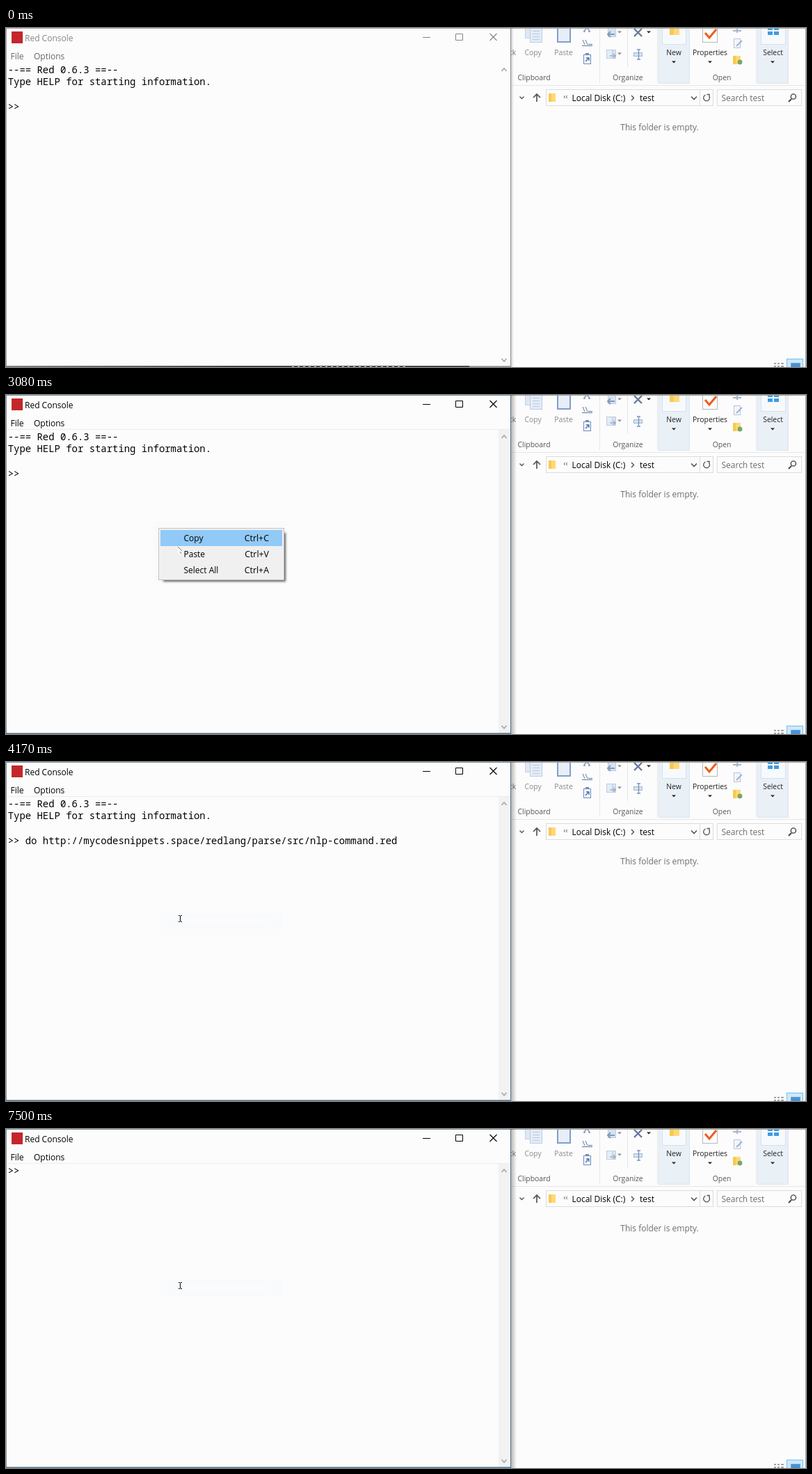
Write an HTML page with a canvas that moves like this. It is 1150x487 px and loops after 8000 ms.

```html
<!DOCTYPE html>
<html lang="en">
<head>
<meta charset="utf-8">
<title>Console session</title>
<style>
html, body { margin: 0; width: 100%; height: 100%; overflow: hidden; background: #fcfcfc; }
canvas { display: block; }
</style>
</head>
<body>
<canvas id="stage" width="1150" height="487"></canvas>
<script>
const ctx = document.getElementById('stage').getContext('2d');
const LOOP = 8000;
const UI = '"Open Sans", "Noto Sans", sans-serif';
const MONO = '"Noto Sans Mono", "DejaVu Sans Mono", monospace';
const BG = '#fcfcfc';

function rect(x, y, w, h, fill) {
  ctx.fillStyle = fill;
  ctx.fillRect(x, y, w, h);
}

function box(x, y, w, h, fill, stroke) {
  rect(x, y, w, h, fill);
  ctx.strokeStyle = stroke;
  ctx.lineWidth = 1;
  ctx.strokeRect(x + 0.5, y + 0.5, w - 1, h - 1);
}

function path(d, stroke, width = 1, fill) {
  const p = new Path2D(d);
  if (fill) { ctx.fillStyle = fill; ctx.fill(p); }
  if (stroke) { ctx.strokeStyle = stroke; ctx.lineWidth = width; ctx.stroke(p); }
}

function label(str, x, y, size = 12, color = '#000', align = 'left', family = UI) {
  ctx.font = `${size}px ${family}`;
  ctx.textAlign = align;
  ctx.fillStyle = color;
  ctx.fillText(str, x, y);
}

function fade(alpha, draw) {
  ctx.save();
  ctx.globalAlpha = alpha;
  draw();
  ctx.restore();
}

const dropArrow = (x, y, color = '#222') =>
  path(`M${x - 3} ${y - 1.5}h6l-3 3z`, null, 0, color);
const folder = (x, y, w, h) => {
  rect(x, y, w, h, '#ffd977');
  rect(x, y, w * 0.4, h, '#f7c951');
};

// ---- File browser ----

function ribbonIcons() {
  box(746, -4, 17, 19, '#dfe8f4', '#c3d2e6');
  box(753, -2, 18, 23, '#e4ecf7', '#bdcde3');
  for (let y = 4; y < 17; y += 4) rect(757, y, 10, 1, '#b9cae2');
  box(792, -4, 20, 25, '#e7eef8', '#819fc9');
  path('M793 -1V20H811V-1', '#819fc9', 2);

  path('M831 4l6 -6M839 4l-6 -6', '#7f93b3', 1.4);
  path('M830 5h3M837 5h3', '#7f93b3', 1.6);
  path('M829 17l3 7M833 17l3 7M837 23.5h6M828 25.5h15', '#60779c', 1);
  box(830, 38, 11, 14, '#f4f7fb', '#6f8db8');
  rect(833, 36, 5, 3, '#6f8db8');
  path('M833 48l4 -4M834 43h4v4', '#436fa9', 1.3);

  for (const y of [6, 37]) {
    box(865, y - 6, 12, 13, '#d8e3f1', '#bccde3');
    dropArrow(882, y, '#8b8b8b');
  }
  path('M875 9h-10m4 -4l-4 4l4 4', '#829bbd', 2);
  box(863, 31, 9, 13, '#e5edf7', '#bccde3');
  path('M868 40h8m-3 -3l3 3l-3 3', '#9db0ca', 1.5);
  path('M903 1l11 11M914 1l-11 11', '#667a9d', 2.4);
  dropArrow(924, 6);
  box(902, 35, 13, 6, '#d5e2f2', '#a3b9d6');
  path('M907 31h5M909.5 31v14M907 45h5', '#7b93b5', 1.3);

  box(943, -1, 35, 25, '#f7fafd', '#d5e1ec');
  folder(954, -2, 14, 12);
  box(1001, -2, 22, 23, '#fdfdfd', '#b8b8b8');
  path('M1005 7l6 7l10 -12', '#f25b1d', 3);
  path('M1045 4h12M1051 -1v8', '#a8b7cd', 2);
  box(1046, 15, 10, 14, '#f3f6fa', '#b9c5d7');
  path('M1050 26l8 -8', '#9fb3ce', 2);
  folder(1045, 40, 11, 12);
  ctx.beginPath();
  ctx.arc(1055, 49, 3.4, 0, 7);
  ctx.fillStyle = '#7da661';
  ctx.fill();

  box(1085, -1, 36, 25, '#f7fafd', '#d5e1ec');
  for (const x of [1095, 1104]) {
    rect(x, -2, 7, 5, '#3f9be0');
    rect(x, 5, 7, 5, '#3f9be0');
  }
}

function fileBrowser() {
  rect(724, 0, 426, 487, BG);
  box(938, -1, 45, 81, '#e9f0f6', '#dbe5ee');
  box(1080, -1, 45, 81, '#e9f0f6', '#dbe5ee');
  for (const x of [853, 936, 1078]) rect(x, 0, 1, 79, '#e4e5e6');
  rect(893, 0, 1, 56, '#e4e5e6');
  rect(726, 82, 424, 1, '#e6e7e8');
  ribbonIcons();

  const ribbon = [['ck', 728, '#777'], ['Copy', 757.5, '#8a8a8a'], ['Paste', 801.5, '#8a8a8a'],
    ['New', 960, '#222'], ['Properties', 1012, '#222'], ['Select', 1102.5, '#222']];
  for (const [str, x, color] of ribbon) label(str, x, 39, 10.4, color, 'center');
  for (const x of [960, 1012, 1102]) dropArrow(x, 49);
  for (const [str, x] of [['Clipboard', 759], ['Organize', 894], ['Open', 1029]])
    label(str, x, 75, 10.4, '#555', 'center');

  path('M738.5 98.5l3 3l3 -3', '#555', 1.4);
  path('M763 106v-11m-5 5l5 -5l5 5', '#555', 1.7);
  box(776, 88, 241, 24, BG, '#dcdcdc');
  rect(997, 89, 1, 22, '#dcdcdc');
  folder(780, 94, 10, 12);
  path('M804 97l-2 2l2 2M807 97l-2 2l2 2', '#555', 0.9);
  label('Local Disk (C:)', 813.5, 104.5);
  path('M899 97l3.5 3.5l-3.5 3.5', '#444', 1.3);
  label('test', 911, 104.5);
  path('M985 98.5l4 4l4 -4', '#555', 1.6);
  path('M1010.5 97.5a4.4 4.4 0 1 1 -5 -1.3M1007.5 95.5h3.6v3.6', '#555', 1.3);
  box(1022, 88, 122, 24, BG, '#dcdcdc');
  label('Search test', 1028.5, 104.5, 12, '#6d6d6d');
  path('M1129 102l-4 4', '#444', 2);
  path('M1135.5 98.5a3.6 3.6 0 1 1 -7.2 0a3.6 3.6 0 1 1 7.2 0', '#444', 1.4);
  label('This folder is empty.', 939.5, 147, 12, '#6d6d6d', 'center');

  for (const y of [481, 485]) {
    rect(1104, y, 3, 2, '#a5a5a5');
    rect(1109, y, 3, 2, '#a5a5a5');
    rect(1114, y, 4, 2, '#a5a5a5');
  }
  box(1122, 475, 24, 14, '#cde8fb', '#76bde8');
  box(1128, 481, 14, 8, '#4b91d2', '#6fa4d4');
  rect(726, 0, 424, 1, '#a4a4a4');
  rect(1149, 0, 1, 487, '#a4a4a4');
}

// ---- Console window ----

const LINES = [
  '--== Red 0.6.3 ==--',
  'Type HELP for starting information.',
  '',
  '>>',
  '== func [src part][parse src [',
  '    any [',
  '        s: [["take-screenshot:" ...',
  '>>'
];
const COMMAND = ' do http://mycodesnippets.space/redlang/parse/src/nlp-command.red';
const PITCH = 17.75;

function consoleFrame(active) {
  const shadow = ctx.createLinearGradient(726, 0, 734, 0);
  shadow.addColorStop(0, active ? 'rgba(0,0,0,.28)' : 'rgba(0,0,0,.18)');
  shadow.addColorStop(active ? 1 : 0.5, 'rgba(0,0,0,0)');
  rect(726, 0, 8, 487, shadow);

  rect(0, 0, 726, 487, BG);
  const ink = active ? '#000' : '#858585';
  box(8, 5, 16, 17, '#c3272b', '#c3272b');
  label('Red Console', 27, 18.5, 12, ink);
  label('File', 6.5, 44.5, 12, active ? '#000' : '#666');
  label('Options', 40, 44.5, 12, active ? '#000' : '#666');
  path('M599 13.5h11', ink);
  path('M646.5 8.5h10v9h-10z', ink);
  path('M695.5 8l10 10M705.5 8l-10 10', ink, 1.1);

  if (active) {
    rect(1, 49, 724, 1, '#ececec');
    rect(708, 50, 17, 436, '#f2f2f2');
  }
  path('M712.5 62l3.5 -4l3.5 4M712.5 475l3.5 4l3.5 -4', '#a8a8a8', 1.7);

  const edge = active ? '#53738a' : '#8f8f8f';
  rect(0, 0, 726, 1, active ? '#7d919f' : '#a4a4a4');
  rect(0, 0, 1, 487, active ? '#8496a2' : '#a4a4a4');
  rect(725, 0, 1, 487, edge);
  rect(0, 485.5, 726, 1.5, edge);
  if (!active) {
    const strip = ctx.createLinearGradient(0, 0, 666, 0);
    strip.addColorStop(0, '#777');
    strip.addColorStop(0.5, '#2c2528');
    strip.addColorStop(1, '#2c2528');
    rect(0, 485.5, 666, 1.5, strip);
    for (let x = 411; x < 576; x += 8) rect(x, 486, 3, 1, '#ccc');
  }
}

function consoleText(t) {
  const mono = (str, row) => label(str, 2.7, 64.5 + PITCH * row, 13.93, '#000', 'left', MONO);
  if (t >= 7000) return mono('>>', 0);
  LINES.slice(0, t < 5320 ? 4 : 8).forEach((str, row) =>
    mono(row === 3 && t >= 3690 ? str + COMMAND : str, row));
}

const caret = (x, row) => rect(x, 50.5 + PITCH * row, 1.3, 17.5, '#000');

function blinkingCaret(t) {
  const within = (a, b) => t >= a && t < b;
  if (within(1680, 2470)) caret(27.5, 3);
  if (within(3690, 4170)) caret(563, 3);
  if (within(5320, 5850) || within(6350, 6880)) caret(27.5, 7);
  if (within(7000, 7500)) caret(27.5, 0);
}

// ---- Context menu and pointer ----

const ITEMS = [['Copy', 'Ctrl+C'], ['Paste', 'Ctrl+V'], ['Select All', 'Ctrl+A']];

function menuItem(i, hot) {
  const top = 194 + 23 * i;
  if (hot) rect(222, top, 175, 23, '#91c9f7');
  label(ITEMS[i][0], 255.5, top + 15.8);
  label(ITEMS[i][1], 378, top + 15.8, 12.4, '#000', 'right');
}

function contextMenu(t) {
  if (t < 2470) return;
  if (t < 3690) {
    rect(212, 181, 192, 89, '#fafafa');
    ctx.save();
    ctx.shadowColor = 'rgba(0,0,0,.6)';
    ctx.shadowBlur = 3;
    ctx.shadowOffsetX = ctx.shadowOffsetY = 2;
    rect(224, 196, 176, 70, BG);
    ctx.restore();
    rect(219, 191, 181, 75, BG);
    const hot = t < 2960 ? -1 : t < 3200 ? 0 : 1;
    fade(t < 2590 ? 0.15 : t < 2710 ? 0.42 : 1, () => {
      box(219, 191, 181, 75, '#f0f0f0', '#c4c4c4');
      ITEMS.forEach((_, i) => menuItem(i, i === hot));
    });
  } else if (t < 3930) {
    fade(t < 3810 ? 0.76 : 0.3, () => menuItem(1, true));
  } else {
    rect(222, 217, 175, 23, '#f9fafc');
    rect(256, 222, 122, 11, '#fbfbfd');
  }
}

function iBeam(x, y) {
  path(`M${x - 2} ${y - 4.5}h2m1 0h2M${x + 0.5} ${y - 4}v8M${x - 2} ${y + 4.5}h2m1 0h2`, '#111', 1.1);
}

function arrow(x, y) {
  path(`M${x} ${y}l7 7h-4l2.5 4l-1.5 1l-2 -4l-2 2z`, null, 0, '#fcfcfc');
  path(`M${x} ${y}l6 6M${x + 3} ${y + 7}l2 3`, '#777', 1);
}

function pointer(t) {
  if (t < 1420) return;
  if (t < 1540) iBeam(207, 188);
  else if (t < 1680) iBeam(207, 186);
  else if (t < 2470) iBeam(214, 186);
  else if (t < 2960) arrow(219.5, 191);
  else if (t < 3080) arrow(237, 207);
  else if (t < 3690) arrow(247, 218);
  else iBeam(250, 225);
}

function render(t) {
  fileBrowser();
  consoleFrame(t >= 1680);
  consoleText(t);
  contextMenu(t);
  blinkingCaret(t);
  pointer(t);
}

const start = performance.now();
function tick() {
  render((performance.now() - start) % LOOP);
  requestAnimationFrame(tick);
}
tick();
</script>
</body>
</html>
```
